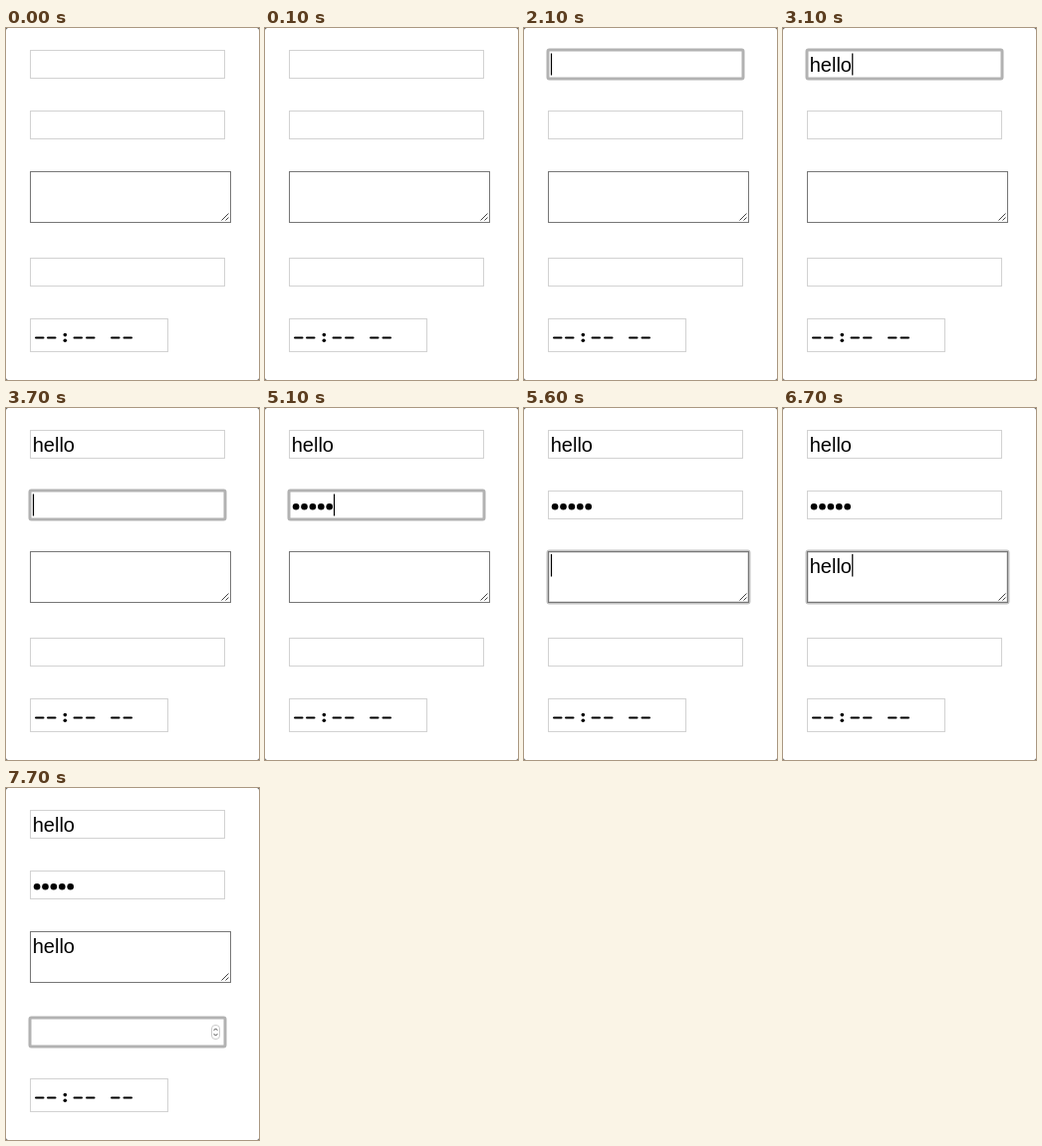
An HTML page for the animation above (8000 ms loop, 254 by 354 pixels).

```html
<!DOCTYPE html>
<html lang="en">
<head>
<meta charset="utf-8">
<title>Form fields</title>
<style>
  html, body { margin: 0; width: 100%; height: 100%; overflow: hidden; background: #fff; }
  svg { display: block; width: 100%; height: 100%; }
  text { font: 20px "Liberation Sans", Arial, Helvetica, sans-serif; fill: #000; }
  .box { fill: none; stroke: #d2d2d2; }
  .area { stroke: #777; }
  .glow { fill: none; stroke: #b2b2b2; stroke-width: 3; }
  .soft { stroke: #c2c2c2; }
  .time { fill: none; stroke: #000; stroke-width: 2; stroke-linecap: round; }
  .grip { fill: none; stroke: #444; stroke-width: 1; }
</style>
</head>
<body>
<svg viewBox="0 0 254 354" xmlns="http://www.w3.org/2000/svg">
  <rect width="254" height="354" fill="#555"/>
  <rect width="254" height="354" rx="2.5" fill="#fff"/>
  <g id="fields"></g>
  <path class="grip" d="M216.5 193.5l7-7M220.5 193.5l3-3"/>
  <g id="spinner">
    <rect x="206.5" y="238.5" width="8" height="14" rx="3.5" fill="#fff" stroke="#ccc"/>
    <path d="M208.7 243.8l1.8-1.9 1.8 1.9M208.7 247.2l1.8 1.9 1.8-1.9" fill="none" stroke="#444"/>
  </g>
  <rect class="box" x="24.5" y="292.5" width="138" height="33"/>
  <g role="img" aria-label="--:-- --">
    <path class="time" d="M30 311.5h7.5M42 311.5h7.5M68.5 311.5h7.5M81 311.5h7.5M106 311.5h7.5M118.5 311.5h7.5"/>
    <circle cx="59.3" cy="308.6" r="1.8"/>
    <circle cx="59.3" cy="314.3" r="1.8"/>
  </g>
</svg>
<script>
const LOOP = 8000, LEFT = 26.7, DOT = 8.4, WORD = 'hello';

// caret: top and height; keys: the time of each keystroke
const fields = [
  { y: 22, w: 196, h: 29, caret: [25.5, 22], base: 44,
    from: 2100, to: 3700, keys: [2600, 2700, 2900, 3000, 3100] },
  { y: 83, w: 196, h: 29, caret: [86.5, 22], secret: true,
    from: 3700, to: 5600, keys: [4500, 4600, 4700, 4900, 5100] },
  { y: 144, w: 202, h: 52, caret: [147, 22.5], base: 166, area: true,
    from: 5600, to: 7200, keys: [6200, 6300, 6400, 6600, 6700] },
  { y: 231, w: 196, h: 29, caret: [234, 22.5],
    from: 7200, to: LOOP, keys: [] }
];

const root = document.getElementById('fields');
const spinner = document.getElementById('spinner');

function add(tag, attrs) {
  const el = document.createElementNS('http://www.w3.org/2000/svg', tag);
  for (const k in attrs) el.setAttribute(k, attrs[k]);
  return root.appendChild(el);
}

function show(el, on) {
  el.style.display = on ? '' : 'none';
}

for (const f of fields) {
  f.glow = add('rect', { class: f.area ? 'glow soft' : 'glow',
    x: 24, y: f.y, width: f.w, height: f.h, rx: 1.5 });
  f.box = add('rect', { class: f.area ? 'box area' : 'box',
    x: 24.5, y: f.y + .5, width: f.w - 1, height: f.h - 1 });
  if (f.secret) {
    f.dots = f.keys.map((_, i) =>
      add('circle', { cx: 31.1 + DOT * i, cy: 99.3, r: 3.3 }));
  } else if (f.base) {
    f.text = add('text', { x: LEFT, y: f.base });
  }
  f.bar = add('rect', { y: f.caret[0], width: 1.2, height: f.caret[1] });
}

function draw(t) {
  for (const f of fields) {
    const typed = f.keys.filter(k => k <= t).length;
    const active = t >= f.from && t < f.to;
    const last = typed ? f.keys[typed - 1] : f.from;
    let end = LEFT;
    if (f.dots) {
      f.dots.forEach((d, i) => show(d, i < typed));
      end += typed * DOT;
    } else if (f.text) {
      f.text.textContent = WORD.slice(0, typed);
      if (typed) end += f.text.getComputedTextLength();
    }
    show(f.glow, active);
    show(f.box, f.area || !active);
    show(f.bar, active && (t - last) % 1000 < 500);
    f.bar.setAttribute('x', end + .2);
  }
  show(spinner, t >= fields[3].from);
}

const start = performance.now();
function tick() {
  draw((performance.now() - start) % LOOP);
  requestAnimationFrame(tick);
}
draw(0);
requestAnimationFrame(tick);
</script>
</body>
</html>
```
